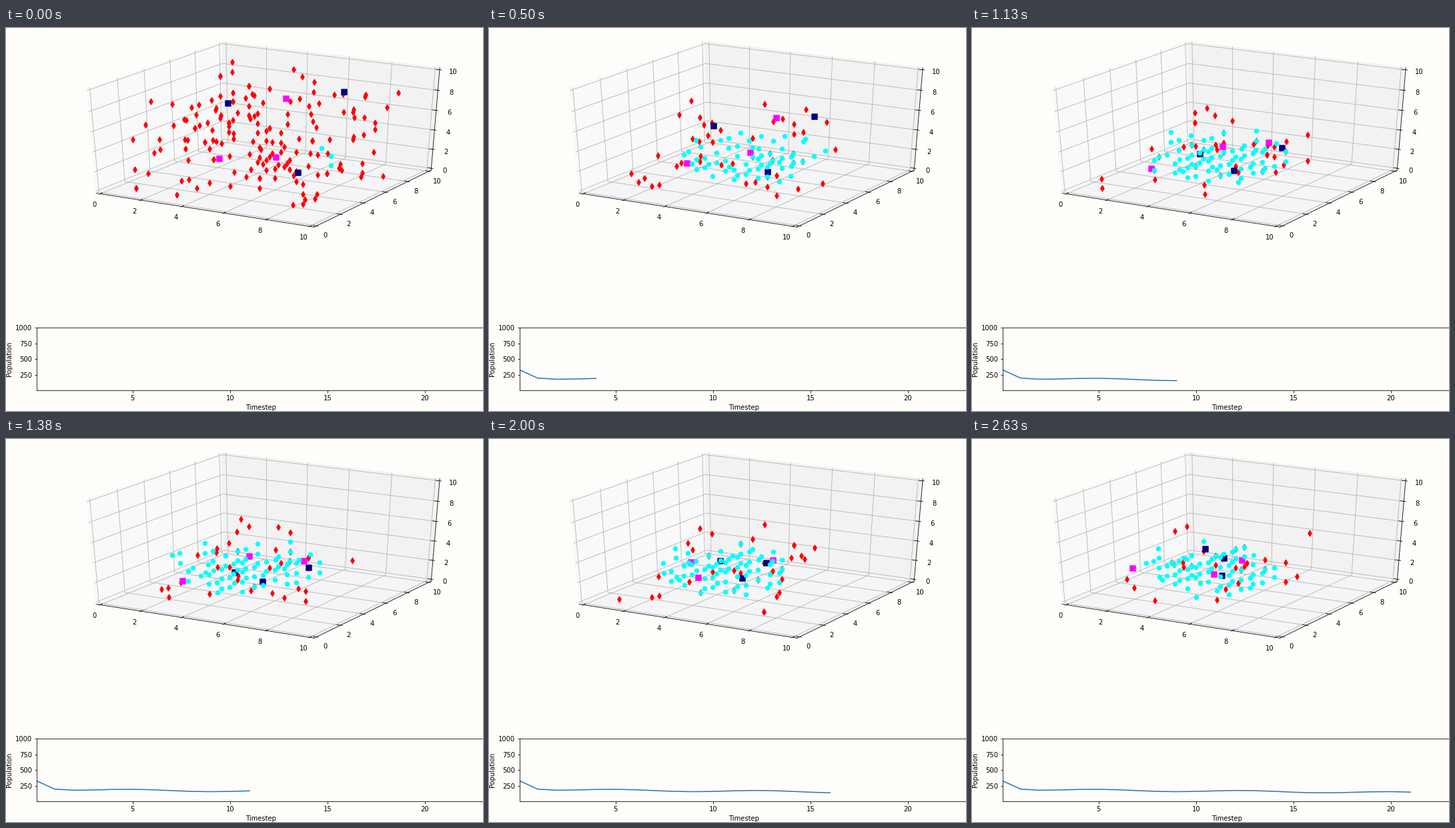
A matplotlib script that plays this animation: 715 px wide and 574 px high, repeating every 2.76 s.

```python
import matplotlib.pyplot as plt
import numpy as np
from matplotlib.animation import FuncAnimation

W, H, DPI = 715, 574, 64
PT = 72 / DPI  # points per pixel
LOOP, TICK, STEPS = 2760, 20, 22
STARTS = np.round(np.arange(STEPS) * LOOP / STEPS, -1)
BACK = "#fffdfa"
LOW, HIGH = -10 / 48, 10 + 10 / 48

# Start, middle and end of each square agent's path.
MAGENTA_PATHS = np.array([
    [(420, 106), (449, 183), (405, 182)],
    [(320, 196), (260, 214), (363, 203)],
    [(405, 194), (371, 175), (241, 194)],
])
NAVY_PATHS = np.array([
    [(333, 113), (343, 202), (350, 165)],
    [(507, 96), (458, 194), (378, 179)],
    [(438, 217), (386, 214), (375, 205)],
])

plt.rcParams.update({
    "font.family": "DejaVu Sans", "font.size": 10 * PT,
    "axes.linewidth": 0.8 * PT, "axes.labelpad": 4 * PT,
    "xtick.major.size": 3.5 * PT, "ytick.major.size": 3.5 * PT,
    "xtick.major.width": 0.8 * PT, "ytick.major.width": 0.8 * PT,
    "xtick.major.pad": 3.5 * PT, "ytick.major.pad": 3.5 * PT,
})


def project(points):
    """Perspective view from azimuth -60, elevation 30, to stage pixels."""
    u = np.asarray(points, float) / 10 - 0.5
    s = np.sqrt(3) / 2
    right = u @ [s, 0.5, 0]
    up = u @ [-0.25, s / 2, s]
    dist = 10 - u @ [s / 2, -0.75, 0.5]
    return np.column_stack([390.2 + 3620 * right / dist, 154.4 - 1721 * up / dist])


fig = plt.figure(figsize=(W / DPI, H / DPI), dpi=DPI, facecolor=BACK)
stage = fig.add_axes([0, 0, 1, 1])
stage.set(xlim=(0, W), ylim=(H, 0))
stage.axis("off")


def segment(*points, color="black", z=2):
    stage.plot(*project(points).T, color=color, lw=0.8 * PT, zorder=z)


def draw_box():
    left = [(LOW, LOW, LOW), (LOW, LOW, HIGH), (LOW, HIGH, HIGH), (LOW, HIGH, LOW)]
    back = [(LOW, HIGH, LOW), (LOW, HIGH, HIGH), (HIGH, HIGH, HIGH), (HIGH, HIGH, LOW)]
    floor = [(LOW, LOW, LOW), (HIGH, LOW, LOW), (HIGH, HIGH, LOW), (LOW, HIGH, LOW)]
    for pane, color in ((left, "#f9f9fa"), (back, "#f2f2f3"), (floor, "#f5f4f6")):
        stage.fill(*project(pane).T, color=color, lw=0.8 * PT, zorder=0)

    segment((LOW, LOW, LOW), (HIGH, LOW, LOW))
    segment((HIGH, LOW, LOW), (HIGH, HIGH, LOW))
    segment((HIGH, HIGH, LOW), (HIGH, HIGH, HIGH))

    for v in range(0, 11, 2):
        grid = dict(color="#b0b0b0", z=1)
        segment((v, LOW, LOW), (v, HIGH, LOW), (v, HIGH, HIGH), **grid)
        segment((HIGH, v, LOW), (LOW, v, LOW), (LOW, v, HIGH), **grid)
        segment((LOW, LOW, v), (LOW, HIGH, v), (HIGH, HIGH, v), **grid)
        ticks = (
            ((v, LOW, LOW), (0, -1, 0), (-9, 16.8)),
            ((HIGH, v, LOW), (1, 0, 0), (12.5, 14.8)),
            ((HIGH, HIGH, v), (1, 0, 0), (20, 3.8)),
        )
        for spot, outward, shift in ticks:
            spot, outward = np.array(spot), np.array(outward)
            segment(spot + outward / 12, spot - outward / 6)
            x, y = project([spot])[0] + shift
            stage.text(x, y, str(v), ha="center", va="center")


def draw_chart():
    chart = fig.add_axes([46.2 / W, 1 - 543.2 / H, 671 / W, 94 / H], facecolor=BACK)
    start = 0.089
    chart.set(xlim=(start, start + 671 / 29.22), ylim=(0, 1000),
              xticks=range(5, 21, 5), yticks=range(250, 1001, 250),
              xlabel="Timestep", ylabel="Population")
    return chart.plot([], [], color="#1f77b4", lw=1.5 * PT)[0]


def markers(shape, color, size, z):
    return stage.scatter([], [], s=(size * PT) ** 2, marker=shape, color=color,
                         lw=1.5 * PT, zorder=z)


draw_box()
curve = draw_chart()
drifters = markers("d", "#ff0000", 6, 5)
magenta = markers("s", "#ff00ff", 7.5, 6)
navy = markers("s", "#000080", 7.5, 7)
cells = markers("o", "#00ffff", 6, 8)

rng = np.random.default_rng(5)
homes = rng.integers([1, 1, 0], 10, (172, 3))
rank = np.hypot(*(homes[:, :2] - 4.5).T) + rng.normal(0, 2, len(homes))
homes = homes[np.argsort(-rank)]
sway = rng.uniform(0, 2 * np.pi, homes.shape)
sway_speed = rng.uniform(0.3, 1, homes.shape)

sites = np.stack(np.meshgrid(*[np.arange(10)] * 3), -1).reshape(-1, 3)
luck = rng.uniform(0, 2 * np.pi, len(sites))
luck_speed = rng.uniform(0.1, 0.4, len(sites))


def population(t):
    """A sharp first drop, then a slow decline with a swell."""
    return 192 - 2.5 * t + 14 * np.cos(2 * np.pi * (t - 5) / 7.5) + 155 * np.exp(-2 * t)


def drifter_points(step):
    """Diamonds start all over the box, thin out and sink towards the floor."""
    count = int(50 - step + 122 * np.exp(-step / 0.9))
    early = np.exp(-step / 4)
    center = np.array([4.1, 3.9, 2.5]) + early * np.array([0.4, 0.6, 2])
    spread = np.array([0.66, 0.66, 0.45]) + early * np.array([0.34, 0.34, 0.55])
    wander = 0.9 * min(step, 1) * np.sin(sway + sway_speed * step)
    spots = center + (homes - 4.5) * spread + wander
    return project(np.clip(np.round(spots[:count]), 0, 9))


def cell_points(step):
    """Cells fill the lattice sites of a slowly moving, ragged ellipsoid."""
    count = int(3 + 67 * (1 - np.exp(-step / 2)))
    early = np.exp(-step / 4)
    center = np.array([4.4, 4.1, 2.6]) + early * np.array([1.8, 2.8, -0.5])
    far = (((sites - center) / (3, 3, 1.9)) ** 2).sum(1)
    ragged = (0.5 + 0.7 * early) * np.sin(luck + luck_speed * step)
    return project(sites[np.argsort(far + ragged)[:count]])


def agent_points(paths, step):
    start, middle, end = paths.swapaxes(0, 1)
    half = 2 * step / (STEPS - 1)
    if half < 1:
        return start + (middle - start) * half
    return middle + (end - middle) * (half - 1)


def update(frame):
    step = np.searchsorted(STARTS, (frame + 1) * TICK) - 1
    drifters.set_offsets(drifter_points(step))
    magenta.set_offsets(agent_points(MAGENTA_PATHS, step))
    navy.set_offsets(agent_points(NAVY_PATHS, step))
    cells.set_offsets(cell_points(step))
    times = np.arange(step + 1)
    curve.set_data(times, population(times))
    return drifters, magenta, navy, cells, curve


animation = FuncAnimation(fig, update, frames=LOOP // TICK, interval=TICK,
                          repeat=True, repeat_delay=0)
plt.show()
```
